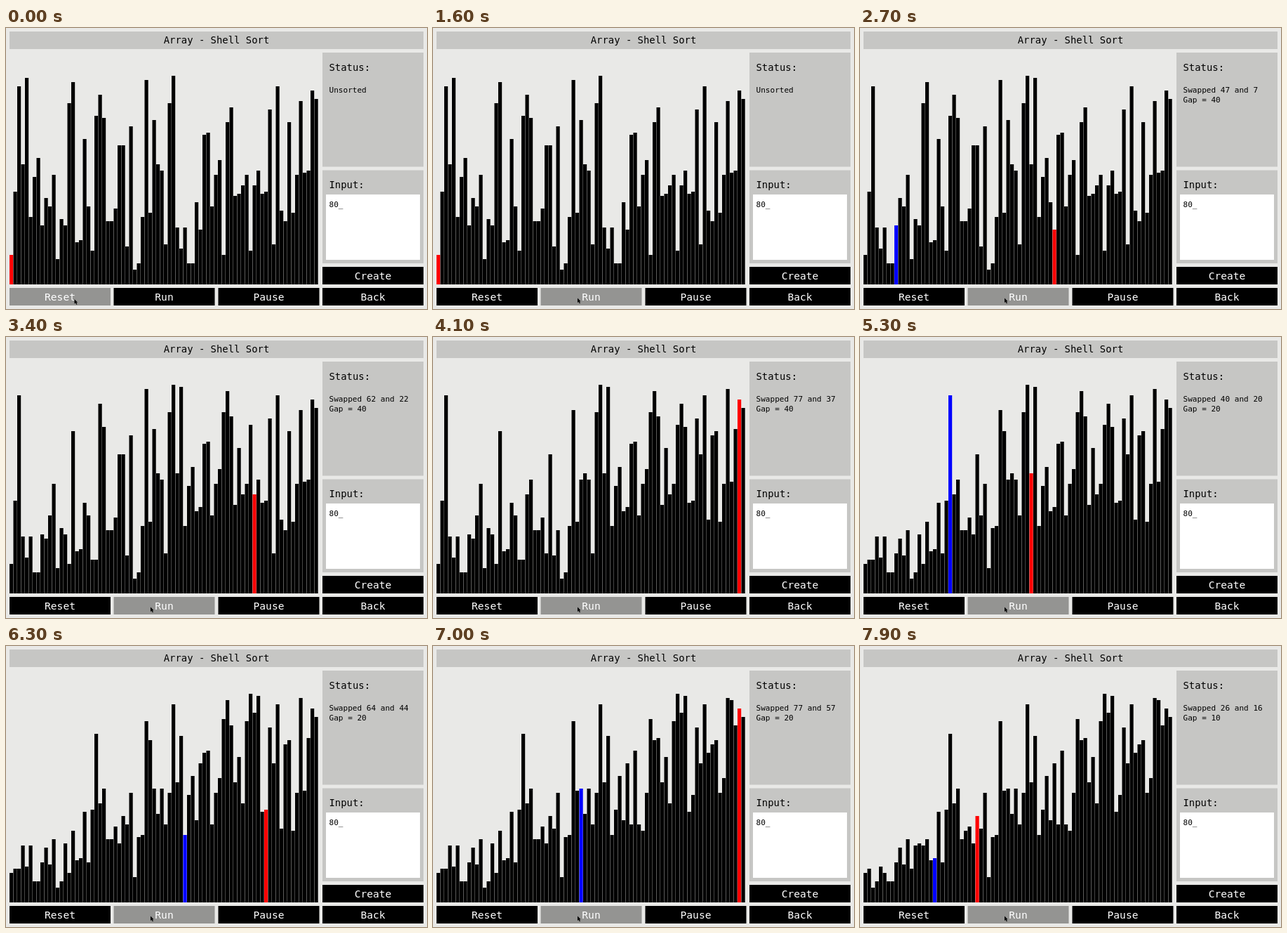
Write an HTML page that moves like this. It is 600 px wide and 400 px high and loops after 8 s.

```html
<!DOCTYPE html>
<html lang="en">
<head>
<meta charset="utf-8">
<title>Array - Shell Sort</title>
<style>
html, body { margin: 0; width: 100%; height: 100%; overflow: hidden; background: #e9e9e7; }
svg { display: block; width: 600px; height: 400px; }
text { font-family: "DejaVu Sans Mono", monospace; font-size: 13.9px; white-space: pre; }
.small { font-size: 11.07px; }
.button { font-size: 14.6px; fill: #fff; text-anchor: middle; }
</style>
</head>
<body>
<svg id="stage" viewBox="0 0 600 400"></svg>
<script>
const stage = document.getElementById("stage");
const LOOP = 8000, FRAME = 100, HOVER = "#949492", PANEL = "#c6c6c4";

const start = [
  14, 44, 94, 57, 98, 32, 51, 60, 28, 41, 37, 52, 12, 31, 28, 86, 96, 20, 21, 69,
  37, 16, 80, 90, 79, 30, 30, 36, 66, 66, 18, 75, 7, 10, 32, 97, 34, 78, 57, 54,
  19, 86, 99, 27, 17, 27, 10, 10, 39, 26, 71, 72, 37, 52, 59, 14, 77, 84, 42, 43,
  47, 52, 16, 47, 54, 43, 44, 83, 19, 94, 35, 30, 77, 34, 52, 87, 53, 54, 92, 88
];

// Time in ms against sorting steps done; the pace wavers a little.
const pace = [
  [2300, 1.5], [2700, 13.5], [3100, 24.5], [3200, 26.5], [4100, 53.5], [4900, 75.5],
  [5300, 87.5], [5800, 101.5], [6300, 117.5], [6700, 129.5], [7600, 152.5], [7900, 162.5]
];

function add(tag, attrs, content) {
  const el = document.createElementNS("http://www.w3.org/2000/svg", tag);
  for (const key in attrs) el.setAttribute(key, attrs[key]);
  if (content) el.textContent = content;
  return stage.appendChild(el);
}

const box = (x, y, width, height, fill) => add("rect", { x, y, width, height, fill });
const label = (x, y, content, cls = "") => add("text", { x, y, class: cls }, content);

function button(x, y, content) {
  const back = box(x, y, 144, 25, "#000");
  label(x + 72, y + 17.5, content, "button");
  return back;
}

// Every drawn step of the sort: one per outer index and one per swap.
function shellSort(values) {
  const a = values.slice(), steps = [];
  let status = ["Unsorted", ""];
  const record = (red, blue) => steps.push({ a: a.slice(), red, blue, status });
  for (let gap = a.length >> 1; gap > 0; gap >>= 1) {
    for (let i = gap; i < a.length; i++) {
      let j = i;
      record(i + 1, j - gap);
      while (j >= gap && a[j - gap] > a[j]) {
        [a[j], a[j - gap]] = [a[j - gap], a[j]];
        status = [`Swapped ${j} and ${j - gap}`, `Gap = ${gap}`];
        j -= gap;
        record(i + 1, j - gap);
      }
    }
  }
  return steps;
}

const steps = shellSort(start);
const idle = { a: start, red: 0, blue: -1, status: ["Unsorted", ""] };

box(0, 0, 600, 400, "#e9e9e7");
box(5, 5, 590, 25, PANEL);
label(300, 21.5, "Array - Shell Sort").setAttribute("text-anchor", "middle");
box(451, 35, 144, 162.5, PANEL);
label(460.5, 60.5, "Status:");
const lines = [label(460.5, 92, "", "small"), label(460.5, 106, "", "small")];
box(451, 202.5, 144, 132.5, PANEL);
label(460.5, 228, "Input:");
box(456, 237, 134, 93, "#fff");
label(460.5, 255, "80_", "small");
button(451, 340, "Create");
const reset = button(5, 370, "Reset");
const run = button(153.5, 370, "Run");
button(302.5, 370, "Pause");
button(451, 370, "Back");
const bars = start.map((v, i) => box(5 + 5.5 * i, 0, 5.2, 0, "#000"));
const cursor = add("path", { d: "M0 0V6.5L1.5 5.2L2.8 7.8L3.9 7.2L2.8 4.7H4.6Z" });

function stepAt(t) {
  if (t < pace[0][0]) return idle;
  let k = 0;
  while (k < pace.length - 2 && t >= pace[k + 1][0]) k++;
  const [t0, s0] = pace[k], [t1, s1] = pace[k + 1];
  return steps[Math.floor(s0 + (s1 - s0) * (t - t0) / (t1 - t0))];
}

function movePointer(t) {
  const u = Math.min(1, Math.max(0, (t - 600) / 1000));
  const e = u * u * (3 - 2 * u);
  const x = 97.5 + 108.5 * e;
  const y = 386 - 1.5 * e + 2.5 * Math.sin(Math.PI * e);
  cursor.setAttribute("transform", `translate(${x} ${y})`);
  reset.setAttribute("fill", x < 149 ? HOVER : "#000");
  run.setAttribute("fill", x >= 153.5 ? HOVER : "#000");
}

function draw(time) {
  const t = Math.floor(time % LOOP / FRAME) * FRAME;
  const { a, red, blue, status } = stepAt(t);
  bars.forEach((bar, i) => {
    bar.setAttribute("y", 365 - 3 * a[i]);
    bar.setAttribute("height", 3 * a[i]);
    bar.setAttribute("fill", i === red ? "#f00" : i === blue ? "#00f" : "#000");
  });
  lines.forEach((line, i) => { line.textContent = status[i]; });
  movePointer(t);
}

const origin = performance.now();
function tick() {
  draw(performance.now() - origin);
  requestAnimationFrame(tick);
}
tick();
</script>
</body>
</html>
```
